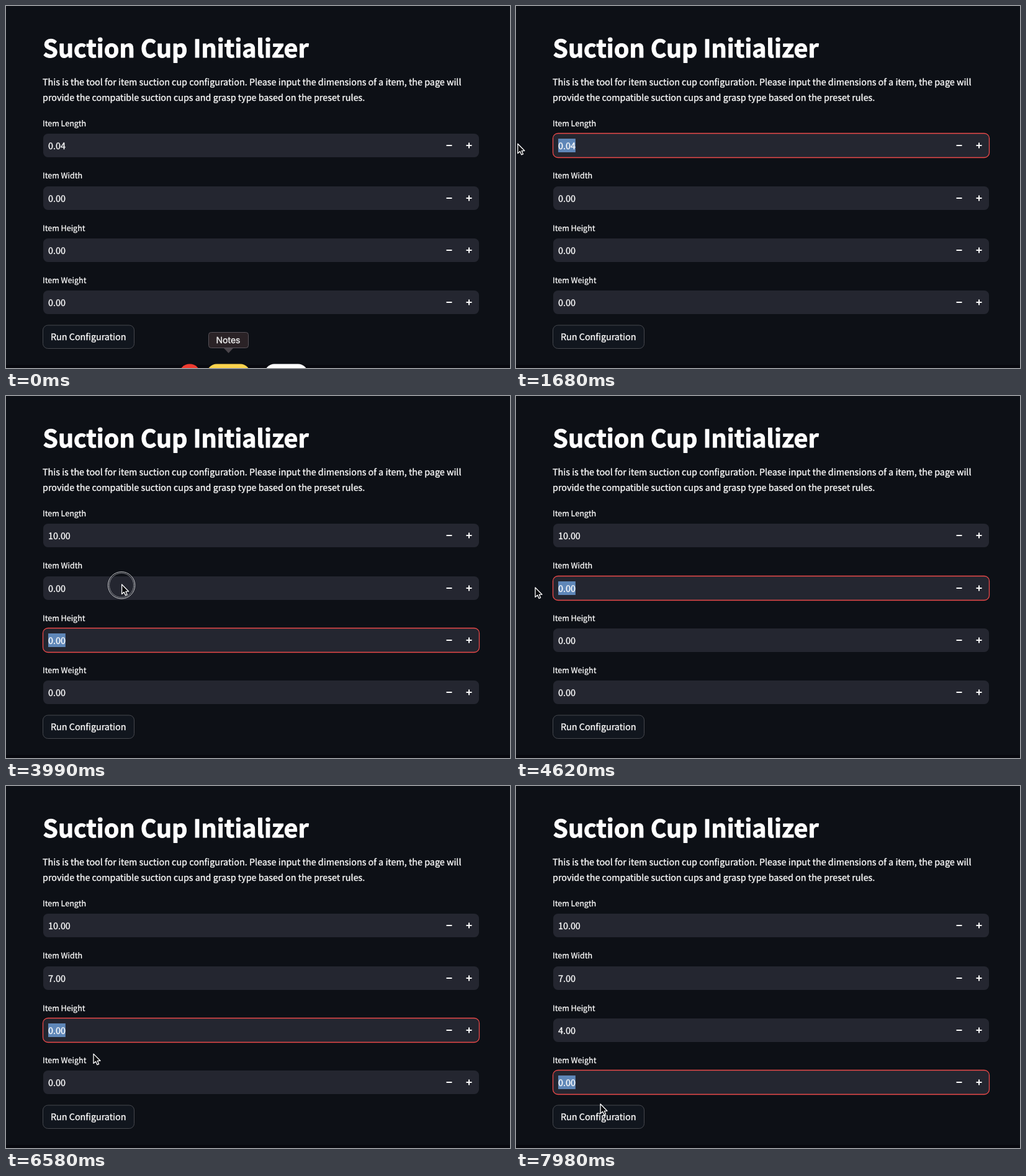
Write an HTML page with a canvas that moves like this. It is 812 px wide and 584 px high and loops after 8000 ms.

```html
<!DOCTYPE html>
<html lang="en">
<head>
<meta charset="utf-8">
<title>Suction Cup Initializer</title>
<style>
html, body { margin: 0; width: 100%; height: 100%; overflow: hidden; background: #0d1016; }
canvas { display: block; }
</style>
</head>
<body>
<canvas id="stage" width="812" height="584"></canvas>
<script>
const ctx = document.getElementById('stage').getContext('2d');
const LOOP = 8000, WHITE = '#fafafa', BG = '#0d1016', DARK = '#08090c';
const SANS = '"Noto Sans CJK SC", "Noto Sans CJK JP", "Noto Sans CJK", "Open Sans", sans-serif';
const BODY = 14.33, SMALL = 12.54, TITLE = 39.4;
const TEXT_X = 68, PITCH = 84.4;
const KEY_GAP = 210, FADE = 200, PRESS_LEAD = 140;

const fields = [
  { label: 'Length', start: '0.04', typed: '10', at: 1820, wake: 3430 },
  { label: 'Width', start: '0.00', typed: '7', at: 4830, wake: 5040 },
  { label: 'Height', start: '0.00', typed: '4', at: 6720, wake: 6860 },
  { label: 'Weight', start: '0.00', at: Infinity }
];

// A focus with a drag time comes from the mouse, the others from the Tab key
const focuses = [
  { at: 740, field: 0, drag: 590 },
  { at: 2450, field: 1 },
  { at: 2800, field: 2 },
  { at: 4130, field: 1, drag: 350 },
  { at: 5530, field: 2, drag: 420 },
  { at: 7070, field: 3, drag: 490 }
];

// Key points of the pointer: [time, x, y]
const path = [
  [70, 358, 590], [560, 115, 217], [770, 115, 217], [1400, 2, 222],
  [3430, 8, 224], [3990, 187, 304], [4410, 8, 311], [4620, 31, 309],
  [5040, 31, 309], [5530, 120, 399], [6090, -30, 399], [6160, 70, 391],
  [6580, 141, 432], [7070, 135, 483], [7490, 5, 483], [7980, 136, 513]
];

const clamp = v => Math.max(0, Math.min(1, v));

function setFont(size, family = SANS) {
  ctx.font = `${size === TITLE ? 700 : 400} ${size}px ${family}`;
}

// The thin outline thickens the strokes, as light text on dark looks bolder
function text(str, x, y, size, color = WHITE, align = 'left', family = SANS) {
  setFont(size, family);
  ctx.fillStyle = ctx.strokeStyle = color;
  ctx.lineWidth = size * .024;
  ctx.lineJoin = 'round';
  ctx.textAlign = align;
  ctx.fillText(str, x, y);
  ctx.strokeText(str, x, y);
}

function box(x, y, w, h, r, fill, stroke, line = 1) {
  ctx.beginPath();
  ctx.roundRect(x, y, w, h, r);
  if (fill) { ctx.fillStyle = fill; ctx.fill(); }
  if (stroke) { ctx.strokeStyle = stroke; ctx.lineWidth = line; ctx.stroke(); }
}

function bar(x, y, w, h, color) {
  ctx.fillStyle = color;
  ctx.fillRect(x, y, w, h);
}

function pointerAt(t) {
  const i = path.findIndex(p => p[0] > t);
  if (i < 1) return path.at(i).slice(1);
  const [t0, x0, y0] = path[i - 1], [t1, x1, y1] = path[i];
  const k = (t - t0) / (t1 - t0);
  return [x0 + (x1 - x0) * k, y0 + (y1 - y0) * k];
}

function page() {
  bar(0, 0, 812, 584, BG);
  bar(0, 579, 812, 5, '#08090f');
  text('Suction Cup Initializer', 59.3, 83, TITLE, '#ffffff');
  text('This is the tool for item suction cup configuration. Please input the dimensions of a item, the page will', 59, 128, BODY);
  text('provide the compatible suction cups and grasp type based on the preset rules.', 59, 153, BODY);
  box(59.5, 515, 147, 37.5, 8, '#11161e', '#46484e');
  text('Run Configuration', 72, 538.6, BODY);
}

function valueAt(i, t) {
  const { start, typed, at } = fields[i];
  if (t < at) return start;
  const left = focuses.find(f => f.at > at);
  if (t >= left.at) return Number(typed).toFixed(2);
  return typed.slice(0, 1 + Math.floor((t - at) / KEY_GAP));
}

// Left and right edge of the selected text; equal when only the caret shows
function selection(str, focus, t, pointerX) {
  setFont(BODY);
  const edge = n => TEXT_X + ctx.measureText(str.slice(0, n)).width;
  const end = edge(str.length);
  if (t >= fields[focus.field].at) return [end, end];
  if (!focus.drag || t >= focus.at + focus.drag) return [TEXT_X, end];
  let n = str.length;
  while (n > 0 && pointerX < (edge(n) + edge(n - 1)) / 2) n--;
  return [edge(n), end];
}

// Border fades in on focus and out when the next field takes over
function glowAt(i, t, focus) {
  if (!focus) return 0;
  const k = clamp((t - focus.at) / FADE);
  if (focus.field === i) return k;
  const before = focuses[focuses.indexOf(focus) - 1];
  return before && before.field === i ? 1 - k : 0;
}

function drawField(i, t, focus, pointerX) {
  const top = Math.round(205.2 + PITCH * i), mid = top + 20;
  const str = valueAt(i, t);
  text('Item ' + fields[i].label, 59, 193.7 + PITCH * i, SMALL);
  box(60, top + 1, 702, 38, 7.5, '#242630');

  const glow = glowAt(i, t, focus);
  if (glow > 0) box(59.5, top + .5, 703, 39, 8, null, `rgba(236,74,74,${glow})`, 1.3);

  if (focus && focus.field === i) {
    const [from, end] = selection(str, focus, t, pointerX);
    if (end > from) bar(from, mid - 11, end - from, 22, '#5f87b8');
    else bar(end, mid - 9, 1, 19, WHITE);
    if (t >= fields[i].at) text('Press Enter to apply', 689, top + 33, 10.75, '#a4a5a9', 'right');
  }
  text(str, TEXT_X, top + 25.5, BODY);
  bar(709.5, mid - 1, 9, 2, WHITE);
  bar(741.5, mid - 1, 9, 2, WHITE);
  bar(745, mid - 4.5, 2, 9, WHITE);
}

function dock(t) {
  if (t < 70) {
    box(326.5, 526.5, 64, 25, 4, '#2a2226', '#575259');
    ctx.beginPath();
    ctx.moveTo(351, 552);
    ctx.lineTo(358.5, 560);
    ctx.lineTo(366, 552);
    ctx.fillStyle = '#4a454b';
    ctx.fill();
    text('Notes', 358, 543.7, 14, '#eeeeee', 'center', 'Inter, sans-serif');
  }
  const y = 577.5 + clamp((t - 70) / 280) * 14;
  box(278.5, y, 35, 35, 17.5, '#ee3b30');
  box(323.5, y, 70, 70, 16, '#fbd34d');
  box(416.5, y, 70, 70, 16, '#ffffff');
}

function arrow(x, y) {
  const shape = [[0, 0], [0, 15.5], [3.6, 12.3], [6, 17.6], [8.6, 16.5], [6.3, 11.3], [11, 11.2]];
  ctx.beginPath();
  for (const [dx, dy] of shape) ctx.lineTo(x + dx, y + dy);
  ctx.closePath();
  ctx.fillStyle = DARK;
  ctx.fill();
  ctx.strokeStyle = '#ffffff';
  ctx.lineWidth = 1.3;
  ctx.stroke();
}

function ibeam(x, y) {
  ctx.beginPath();
  for (const s of [-1, 1]) {
    ctx.moveTo(x - 3.5, y + 8 * s);
    ctx.quadraticCurveTo(x, y + 8 * s, x, y + 5 * s);
    ctx.quadraticCurveTo(x, y + 8 * s, x + 3.5, y + 8 * s);
  }
  ctx.moveTo(x, y - 6);
  ctx.lineTo(x, y + 6);
  ctx.moveTo(x - 2, y + 3);
  ctx.lineTo(x + 2, y + 3);
  for (const [width, color] of [[3, '#ffffff'], [1, DARK]]) {
    ctx.lineWidth = width;
    ctx.strokeStyle = color;
    ctx.stroke();
  }
}

function ring(x, y, r, color) {
  ctx.beginPath();
  ctx.arc(x, y, r, 0, 2 * Math.PI);
  ctx.strokeStyle = color;
  ctx.lineWidth = 1;
  ctx.stroke();
}

function pointer(t, x, y) {
  // Typing hides the pointer until the mouse moves again
  if (fields.some(f => t >= f.at && t < f.wake)) return;
  const pressed = focuses.some(f => f.drag && t >= f.at - PRESS_LEAD && t < f.at + f.drag);
  const overField = x > 60 && x < 700 && y > 206 && y < 498 && (y - 206) % PITCH < 38;
  if (pressed) {
    ring(x - .5, y + 1.3, 21.7, '#c9cacd');
    ring(x - .5, y + 1.3, 19.6, '#85878c');
  }
  if (overField && !pressed) ibeam(x, y);
  else arrow(x, y);
}

function draw(t) {
  const [x, y] = pointerAt(t);
  const focus = focuses.findLast(f => f.at <= t);
  page();
  fields.forEach((_, i) => drawField(i, t, focus, x));
  dock(t);
  pointer(t, x, y);
}

ctx.textRendering = 'geometricPrecision';
function tick() {
  draw(performance.now() % LOOP);
  requestAnimationFrame(tick);
}
tick();
</script>
</body>
</html>
```
